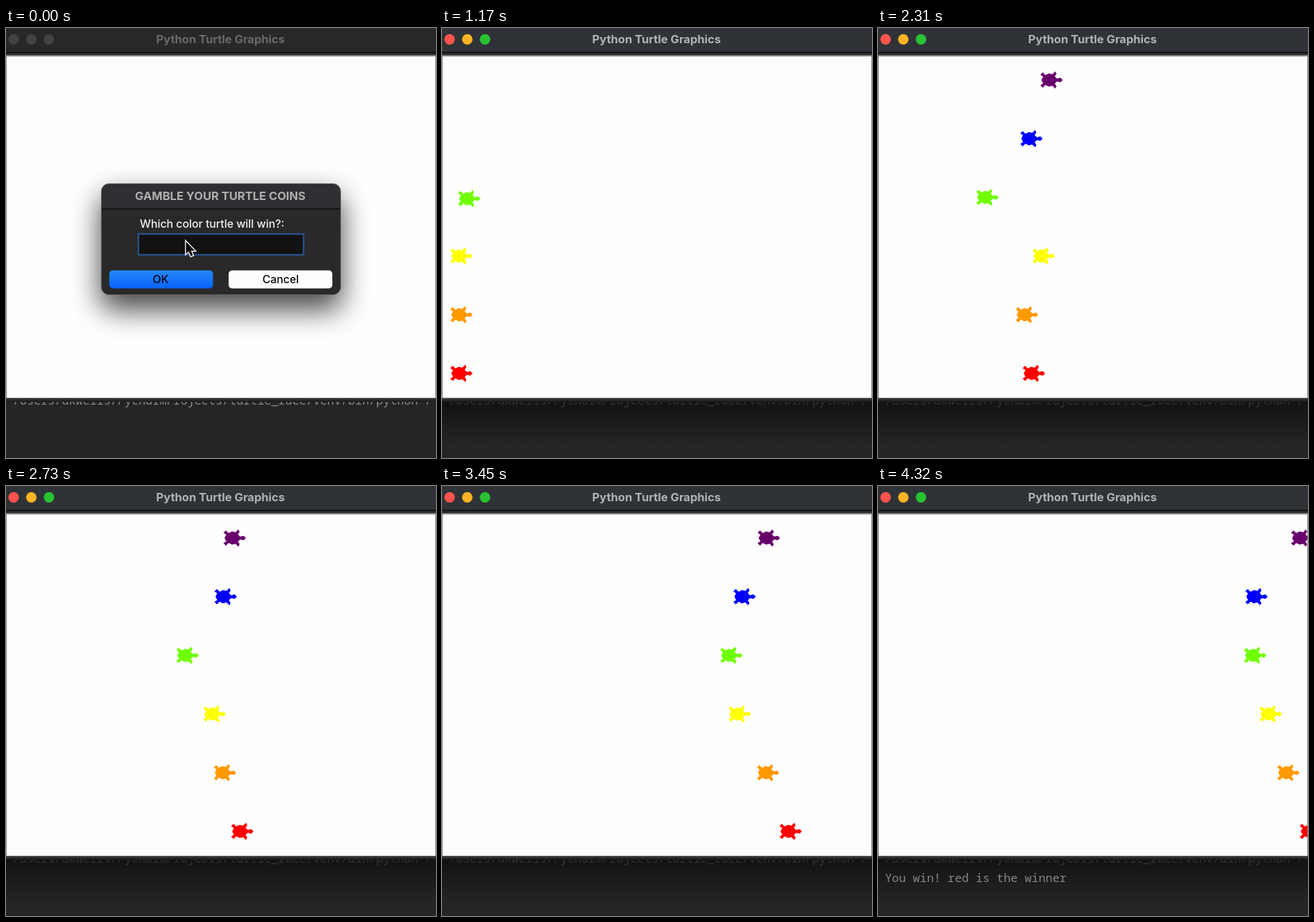
An HTML page for the animation above (4.35 s loop, 620 px wide and 620 px high).

```html
<!DOCTYPE html>
<html lang="en">
<head>
<meta charset="utf-8">
<title>Turtle race</title>
<style>
  html, body { margin: 0; width: 100%; height: 100%; overflow: hidden; background: #252526; }
  svg { display: block; width: 620px; height: 620px; }
  text { font: 500 15.85px Inter, "Open Sans", sans-serif; white-space: pre; }
  .bold { font-weight: 700; font-size: 16.5px; text-anchor: middle; }
  .mid { text-anchor: middle; }
  .mono { font: 400 16.8px "Noto Sans Mono", "DejaVu Sans Mono", monospace; }
</style>
</head>
<body>
<svg viewBox="0 0 620 620">
  <defs>
    <linearGradient id="blue" x2="0" y2="1">
      <stop stop-color="#2588fb"/><stop offset="1" stop-color="#0663f8"/>
    </linearGradient>
    <linearGradient id="fade" x2="0" y2="1">
      <stop stop-color="#0a0a0a" stop-opacity=".7"/><stop offset="1" stop-color="#0a0a0a" stop-opacity="0"/>
    </linearGradient>
    <filter id="soft" x="-50%" y="-80%" width="200%" height="260%"><feGaussianBlur stdDeviation="21"/></filter>
    <clipPath id="canvas"><rect x="1" y="41" width="618" height="492"/></clipPath>
  </defs>

  <rect width="620" height="620" fill="#252526"/>
  <text class="mono" id="path" x="10" y="543">/Users/dkwells/PycharmProjects/turtle_race/venv/bin/python /</text>
  <rect y="538" width="620" height="64" fill="url(#fade)" id="edge"/>
  <text class="mono" id="result" x="10" y="571" fill="#868686">You win! red is the winner</text>

  <rect width="620" height="539" fill="#1c1c1c"/>
  <rect id="bar" width="620" height="35"/>
  <rect y="34.5" width="620" height="1.5" fill="#0c0c0c"/>
  <rect y="36" width="620" height="3" fill="#2c2c2c"/>
  <rect y="39" width="620" height="495" fill="#868686"/>
  <rect x="1" y="41" width="618" height="492" fill="#fefefe"/>
  <rect y="534" width="620" height="3" fill="#303030"/>
  <g id="lights">
    <circle cx="11" cy="16.3" r="7.6"/><circle cx="36.5" cy="16.3" r="7.6"/><circle cx="62" cy="16.3" r="7.6"/>
  </g>
  <text class="bold" id="title" x="309.3" y="21.5">Python Turtle Graphics</text>

  <g id="herd" clip-path="url(#canvas)"></g>

  <g id="dialog">
    <g clip-path="url(#canvas)">
      <rect x="136" y="242" width="348" height="164" rx="16" fill="#000" opacity=".72" filter="url(#soft)"/>
    </g>
    <rect x="137.5" y="224.5" width="345" height="160" rx="11" fill="#29292a"/>
    <path d="M138 260V236a11 11 0 0 1 11-11H471a11 11 0 0 1 11 11V260Z" fill="#2d2f32"/>
    <rect x="138" y="260" width="344" height="1.3" fill="#0e0e0e"/>
    <rect x="137.5" y="224.5" width="345" height="160" rx="11" fill="none" stroke="#636363"/>
    <text class="bold" x="309" y="247.5" fill="#b0b0b1">GAMBLE YOUR TURTLE COINS</text>
    <text x="193" y="288" fill="#f5f5f5">Which color turtle will win?:</text>
    <rect x="191" y="297" width="238" height="30" fill="#121212" stroke="#284f88" stroke-width="2.4"/>
    <text id="field" x="196" y="318" fill="#f5f5f5"></text>
    <rect x="149" y="349.5" width="149.5" height="26" rx="5" fill="url(#blue)"/>
    <rect x="321" y="349.5" width="149.5" height="26" rx="5" fill="#fefefe"/>
    <text class="mid" x="223" y="368" fill="#050512">OK</text>
    <text class="mid" x="396" y="368" fill="#0a0a0a">Cancel</text>
  </g>

  <path id="pointer" d="M0 0V17.5L4 14L7 21L10 19.7L7.2 13H12.6Z" fill="#000" stroke="#fff" stroke-width="2.8" paint-order="stroke"/>
</svg>
<script>
const LOOP = 4350, STEP = 30;
const CLOSE = 540, SETUP = 630, SLOT = 136, TRAVEL = 112, DONE = 4080;
const HOME = [315.2, 292.5], START = 23, NOSE = 20.3, SCALE = 1.27;
const $ = id => document.getElementById(id);

// Upper half of the turtle outline, nose to tail, as [forward, sideways].
const half = [[16, 0], [14, 2], [10, 1], [7, 4], [9, 7], [8, 9], [5, 6], [1, 7],
  [-3, 5], [-6, 8], [-8, 6], [-5, 4], [-7, 0]];
const outline = half.concat(half.slice(1, -1).reverse().map(([x, y]) => [x, -y]));

// Nose positions at the times in MARKS.
const MARKS = [1650, 2310, 2730, 3450, DONE];
const RACERS = [
  ["#ff0000", 92, 240, 356, 518, 639.5],
  ["#ff9900", 87, 230, 331, 485.5, 607],
  ["#ffff00", 97, 254, 316, 444.5, 581.5],
  ["#70ff00", 89.5, 173, 277, 432.5, 559],
  ["#0000fa", 75.5, 236.5, 332, 451.5, 561],
  ["#68006c", 90.5, 265.5, 345, 486.5, 627]
];

const herd = RACERS.map(([color, ...noses], i) => {
  const el = document.createElementNS("http://www.w3.org/2000/svg", "polygon");
  el.setAttribute("points", outline.join(" "));
  el.setAttribute("fill", color);
  el.setAttribute("stroke", color);
  el.setAttribute("stroke-width", 1);
  $("herd").append(el);
  const born = SETUP + i * SLOT;
  const y = 498 - i * 84.6;
  const track = [
    [born, ...HOME], [born + SLOT - TRAVEL + 8, ...HOME], [born + SLOT, START, y], [1450, START, y],
    ...noses.map((n, k) => [MARKS[k], n - NOSE, y])
  ];
  return { el, born, track };
});

const pointerTrack = [[0, 259.5, 308], [270, 259.5, 308], [450, 235.5, 369],
  [780, 235.5, 369], [1050, 170, 645]];

function at(track, t) {
  const n = track.findIndex(p => p[0] > t);
  if (n < 0) return track[track.length - 1].slice(1);
  if (n === 0) return track[0].slice(1);
  const [t0, x0, y0] = track[n - 1], [t1, x1, y1] = track[n];
  const k = (t - t0) / (t1 - t0);
  return [x0 + (x1 - x0) * k, y0 + (y1 - y0) * k];
}

const show = (el, on) => el.setAttribute("visibility", on ? "visible" : "hidden");
const place = (el, [x, y], s = 1) => el.setAttribute("transform", `translate(${x} ${y}) scale(${s})`);

function draw(t) {
  const active = t >= CLOSE;
  $("dialog").style.display = active ? "none" : "";
  $("field").textContent = "red".slice(0, Math.max(0, Math.floor((t - 30) / 60)));
  $("bar").setAttribute("fill", active ? "#2f3236" : "#27282a");
  $("title").setAttribute("fill", active ? "#b2b3b4" : "#6a6a6b");
  $("path").setAttribute("fill", active ? "#808080" : "#8a8a8a");
  show($("edge"), active);
  [...$("lights").children].forEach((dot, i) =>
    dot.setAttribute("fill", active ? ["#ff544d", "#fdb324", "#29c232"][i] : "#424243"));
  for (const { el, born, track } of herd) {
    show(el, t >= born);
    place(el, at(track, t), SCALE);
  }
  place($("pointer"), at(pointerTrack, t));
  show($("pointer"), t < 1050);
  show($("result"), t >= DONE);
}

const begin = performance.now();
function tick() {
  const t = (performance.now() - begin) % LOOP;
  draw(Math.floor(t / STEP) * STEP);
  requestAnimationFrame(tick);
}
tick();
</script>
</body>
</html>
```
